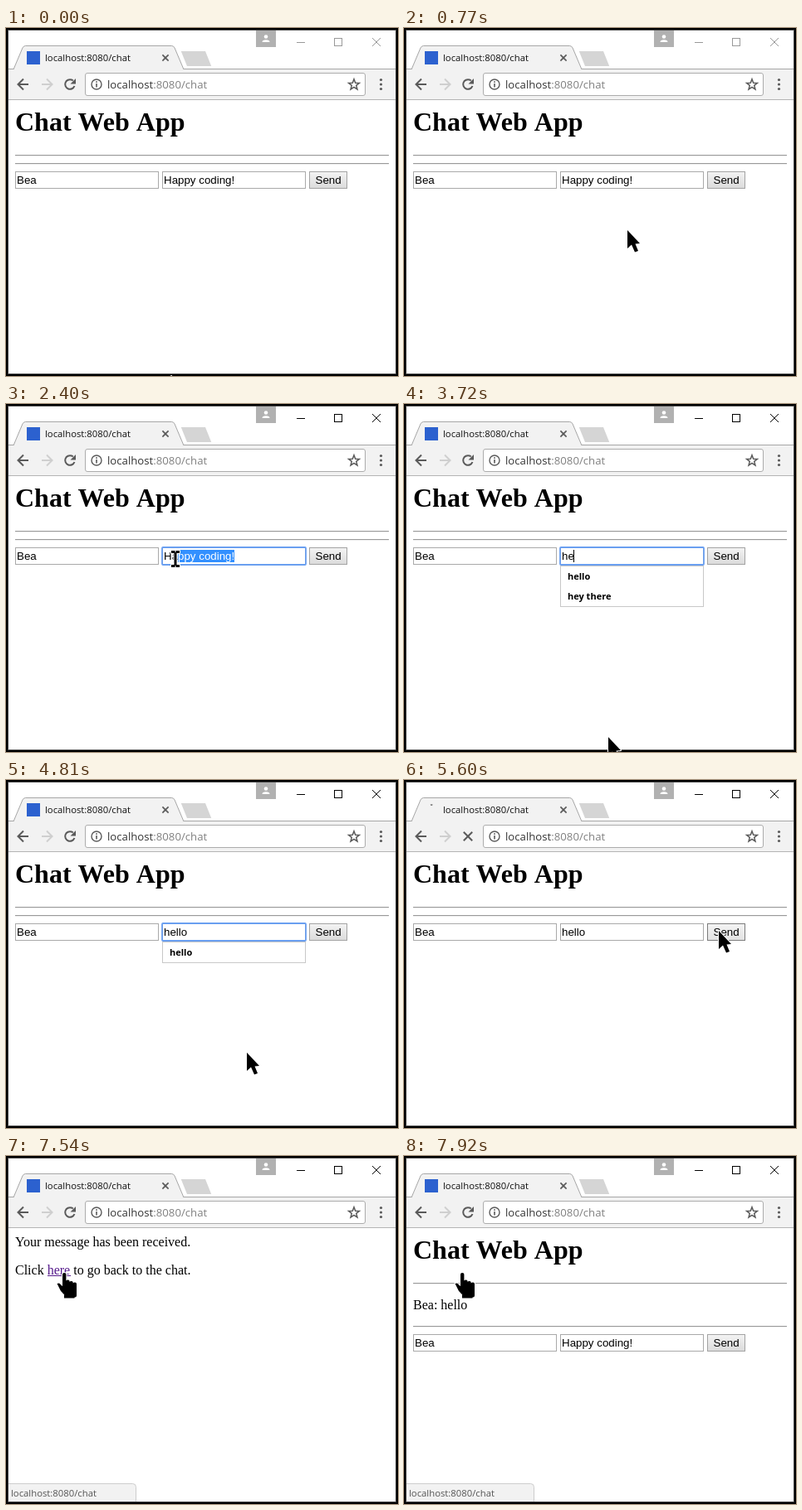
An HTML page with a canvas that plays this animation: 472x420 px, repeating every 8 s.

```html
<!DOCTYPE html>
<html lang="en">
<head>
<meta charset="utf-8">
<title>Chat Web App</title>
<style>
  html, body { margin: 0; width: 100%; height: 100%; overflow: hidden; background: #fff; }
  canvas { display: block; width: 472px; height: 420px; }
</style>
</head>
<body>
<canvas id="stage" width="472" height="420"></canvas>
<script>
const ctx = document.getElementById('stage').getContext('2d');
const LOOP = 8000, TICK = 77.6; // the screen refreshes once per tick
const UI = '"Open Sans", sans-serif';
const SANS = '13.333px "Liberation Sans", Arial, sans-serif';
const SERIF = '"Liberation Serif", "Times New Roman", serif';
const GREY = '#5a5a5a', EDGE = '#a6a6a6', CHROME = '#f2f2f2';
const ADDRESS = 'localhost:8080/chat';
const USER = 'Bea', GREETING = 'Happy coding!', MESSAGE = 'hello';
const SUGGESTIONS = [MESSAGE, 'hey there', GREETING];

// Events, in ticks
const BEAM_IN = 20, FOCUS = 24, DRAG = 28, BEAM_OUT = 38, TYPE = 46;
const PRESS = 70, SUBMIT = 72, RECEIVED = 73, HOVER_LINK = 96, FOLLOW = 99, RETURN = 101;

const linear = p => p;
const easeOut = p => 1 - (1 - p) ** 3;
const START = { x: 199, y: 420 };
const LEGS = [
  { from: 0, to: 11, x: 276, y: 226 },
  { from: 11, to: 22, x: 288, y: 191 },
  { from: 27, to: 36, x: 187, y: 186, ease: easeOut },
  { from: 37, to: 39, x: 246, y: 402 },
  { from: 59, to: 68, x: 379, y: 182 },
  { from: 79, to: 82, x: 349, y: 182 },
  { from: 84, to: 88, x: 244, y: 152 },
  { from: 88, to: 94, x: 74, y: 125 },
  { from: 95, to: 97, x: 69, y: 141 }
];

const within = (v, from, to) => v >= from && v < to;

function pointerAt(n) {
  let { x, y } = START;
  for (const leg of LEGS) {
    if (n <= leg.from) break;
    const p = (leg.ease || linear)(Math.min(1, (n - leg.from) / (leg.to - leg.from)));
    x += (leg.x - x) * p;
    y += (leg.y - y) * p;
  }
  return [Math.round(x), Math.round(y)];
}

function rect(x, y, w, h, fill) {
  ctx.fillStyle = fill;
  ctx.fillRect(x, y, w, h);
}

function stroke(color, width = 1, shape) {
  ctx.strokeStyle = color;
  ctx.lineWidth = width;
  shape ? ctx.stroke(shape) : ctx.stroke();
}

function fill(color, shape) {
  ctx.fillStyle = color;
  shape ? ctx.fill(shape) : ctx.fill();
}

function box(x, y, w, h, edge, back) {
  rect(x, y, w, h, edge);
  rect(x + 1, y + 1, w - 2, h - 2, back);
}

function rounded(x, y, w, h, radius, edge, back) {
  ctx.beginPath();
  ctx.roundRect(x + 0.5, y + 0.5, w - 1, h - 1, radius);
  fill(back);
  stroke(edge);
}

function polygon(...points) {
  const shape = new Path2D();
  points.forEach(([x, y]) => shape.lineTo(x, y));
  shape.closePath();
  return shape;
}

function line(color, width, ...points) {
  ctx.beginPath();
  points.forEach(([x, y]) => ctx.lineTo(x, y));
  stroke(color, width);
}

function cross(x, y, r, color, width) {
  for (const d of [-r, r]) line(color, width, [x - r, y - d], [x + r, y + d]);
}

function arc(x, y, r, from, to, color, width) {
  ctx.beginPath();
  ctx.arc(x, y, r, from, to);
  stroke(color, width);
}

function disc(x, y, r, color) {
  ctx.beginPath();
  ctx.arc(x, y, r, 0, 7);
  fill(color);
}

function widthOf(str, font) {
  ctx.font = font;
  return ctx.measureText(str).width;
}

// Returns the x where the text ends
function text(str, x, y, font, color = '#000') {
  ctx.fillStyle = color;
  const end = x + widthOf(str, font);
  ctx.fillText(str, x, y);
  return end;
}

function drawTitleBar(active) {
  rect(301, 3, 24, 20, '#b1b1b1');
  disc(313, 10.5, 2.3, '#fff');
  ctx.beginPath();
  ctx.ellipse(313, 17, 4.5, 2.7, 0, Math.PI, 0);
  fill('#fff');

  const ink = active ? '#000' : '#999';
  rect(350, 17, 10, 1, ink);
  box(395, 12, 10, 10, ink, '#fff');
  cross(446, 17, 5, ink, 1);
}

function drawTab(spin) {
  line(EDGE, 1, [3, 49.5], [469, 49.5]);
  ctx.beginPath();
  ctx.moveTo(9, 50);
  ctx.arcTo(21, 21.5, 112, 21.5, 4);
  ctx.arcTo(202, 21.5, 214, 50, 4);
  ctx.lineTo(214, 50);
  fill(CHROME);
  stroke(EDGE);

  if (spin === null) rect(25, 28, 16, 16, '#2c61cf');
  else arc(33, 36, 6, spin - 1.75, spin - 1.35, '#777', 1.6);
  text(ADDRESS, 47, 40, '11.3px ' + UI, '#111');
  cross(192, 36, 3.6, GREY, 1.7);

  const button = polygon([213, 29.5], [239, 29.5], [245, 44.5], [219, 44.5]);
  stroke('#d5d5d5', 3, button);
  fill('#d5d5d5', button);
}

function drawArrowIcon(x, dir, color) {
  line(color, 2, [x - 7 * dir, 68], [x + 6 * dir, 68]);
  line(color, 2, [x, 61.5], [x - 6.5 * dir, 68], [x, 74.5]);
}

function drawToolbar(loading) {
  rect(3, 50, 466, 36, CHROME);
  rect(3, 86, 466, 1, '#b4b4b4');
  drawArrowIcon(21, 1, GREY);
  drawArrowIcon(49, -1, '#cfcfcf');
  if (loading) {
    cross(77, 68, 5.2, GREY, 2);
  } else {
    arc(77, 68, 5.8, 0.35, 5.4, GREY, 2);
    fill(GREY, polygon([84, 61], [84, 67.5], [77.5, 67.5]));
  }

  rounded(95, 54, 338, 28, 2.5, '#acacac', '#fff');
  arc(109, 68, 6, 0, 7, GREY, 1.4);
  rect(108.2, 67, 1.6, 4.5, GREY);
  rect(108.2, 64.2, 1.6, 1.7, GREY);
  const [host, rest] = ADDRESS.split(':');
  const end = text(host, 122, 73, '13.2px ' + UI, '#333');
  text(':' + rest, end, 73, '13.2px ' + UI, '#808080');

  const star = Array.from({ length: 10 }, (_, i) => {
    const r = i % 2 ? 2.9 : 6.8, a = i * Math.PI / 5 - Math.PI / 2;
    return [419 + r * Math.cos(a), 68.5 + r * Math.sin(a)];
  });
  stroke(GREY, 1.5, polygon(...star));
  for (let i = -1; i <= 1; i++) disc(451.5, 68 + 5.5 * i, 1.6, GREY);
}

function drawRule(y) {
  rect(11, y, 450, 2, '#eee');
  rect(11, y, 450, 1, '#9a9a9a');
}

function drawField(x, y, value) {
  box(x, y, 173, 21, '#a9a9a9', '#fff');
  text(value, x + 2, y + 15, SANS);
}

function drawButton(y, hover, pressed) {
  const fade = ctx.createLinearGradient(0, y, 0, y + 21);
  fade.addColorStop(0, pressed ? '#d2d2d2' : '#f4f4f4');
  fade.addColorStop(1, pressed || hover ? '#e2e2e2' : '#dadada');
  box(365, y, 46, 21, hover ? '#7c7c7c' : '#a3a3a3', fade);
  text('Send', 372.5, y + 15, SANS);
}

// Selection runs from the character edge nearest the pointer to the end
function drawSelection(pointerX) {
  const edge = i => 190 + widthOf(GREETING.slice(0, i), SANS);
  let first = 0;
  while (first < GREETING.length && (edge(first) + edge(first + 1)) / 2 < pointerX) first++;
  const x = edge(first), left = Math.round(x);
  rect(left, 176, Math.round(edge(GREETING.length)) - left, 15, '#3390ff');
  text(GREETING.slice(first), x, 188, SANS, '#fff');
}

function drawSuggestions(typed) {
  const list = SUGGESTIONS.filter(s => s.toLowerCase().startsWith(typed));
  box(188, 195, 173, 2 + 24 * list.length, '#c8c8c8', '#fff');
  list.forEach((s, i) => text(s, 197, 212 + 24 * i, 'bold 11px ' + UI));
}

function drawFocus(n, typed, pointerX) {
  ctx.beginPath();
  ctx.roundRect(188, 173, 173, 21, 1);
  stroke('#6a9ff0', 1.8);
  if (typed) drawSuggestions(typed);
  else if (n >= DRAG) return drawSelection(n < BEAM_OUT ? pointerX : 0);

  const since = n - (typed ? TYPE + 2 * (typed.length - 1) : FOCUS);
  const x = 190 + widthOf(typed || GREETING, SANS);
  if (since % 14 < 7) rect(Math.round(x) - 1, 176, 1, 15, '#000');
}

function drawChat(n, px, py) {
  const posted = n >= RETURN;
  const y = posted ? 215 : 173;
  text('Chat Web App', 11, 124, 'bold 32px ' + SERIF);
  drawRule(153);
  if (posted) text(`${USER}: ${MESSAGE}`, 11, 185, '16px ' + SERIF);
  drawRule(y - 10);

  // One letter every second tick
  const letters = Math.max(0, Math.floor((n - TYPE) / 2) + 1);
  const typed = posted ? '' : MESSAGE.slice(0, letters);
  drawField(11, y, USER);
  drawField(188, y, typed || GREETING);
  const hover = within(px, 365, 411) && within(py, y, y + 21);
  drawButton(y, hover, within(n, PRESS, SUBMIT));
  if (within(n, FOCUS, PRESS)) drawFocus(n, typed, px);
}

function drawReceipt() {
  const font = '16px ' + SERIF, link = '#551a8b';
  text('Your message has been received.', 11, 109, font);
  const left = text('Click ', 11, 143, font);
  const right = text('here', left, 143, font, link);
  rect(Math.round(left), 144, Math.round(right - left), 1, link);
  text(' to go back to the chat.', right, 143, font);
}

function drawStatus() {
  rounded(2, 395, 155, 24, [0, 4, 0, 0], '#cdcdcd', CHROME);
  text(ADDRESS, 6, 411, '11.3px ' + UI, '#555');
}

function drawBorder() {
  ctx.strokeStyle = '#000';
  ctx.lineWidth = 2;
  ctx.strokeRect(1, 1, 470, 418);
  ctx.strokeStyle = '#484848';
  ctx.lineWidth = 1;
  ctx.strokeRect(2.5, 2.5, 467, 415);
}

const arrow = polygon([0, 0], [0, 22], [5, 17.5], [9, 26.5], [13, 25], [9.5, 16.5], [15, 16]);

const beam = new Path2D();
beam.rect(-1.5, -8, 3, 16);
for (const x of [-5, 0.5]) {
  for (const y of [-10, 7]) beam.rect(x, y, 4.5, 3);
}

// Four fingers, each starting lower than the last, then palm, wrist and thumb
const hand = new Path2D();
for (let i = 0; i < 4; i++) {
  hand.roundRect(-1 + 4.2 * i, i && 7 + 1.5 * i, 4.4, 18, 2);
}
hand.roundRect(-1, 13, 17, 13, 3);
hand.rect(1, 23, 12.5, 7.5);
hand.addPath(polygon([-7.5, 13], [-5, 12.5], [1, 18], [2, 27], [-3, 22]));

function drawPointer(n, x, y) {
  const shape = n >= HOVER_LINK ? hand : within(n, BEAM_IN, BEAM_OUT) ? beam : arrow;
  ctx.save();
  ctx.translate(x, y);
  ctx.lineJoin = 'round';
  stroke('#fff', 2, shape);
  fill('#000', shape);
  ctx.restore();
}

function draw(n) {
  const [x, y] = pointerAt(n);
  const loadStart = within(n, SUBMIT, RECEIVED) ? SUBMIT : within(n, FOLLOW, RETURN) ? FOLLOW : null;
  const loading = loadStart !== null;

  rect(0, 0, 472, 420, '#fff');
  drawTitleBar(n >= FOCUS);
  drawToolbar(loading);
  drawTab(loading ? (n - loadStart) / 2 : null);
  if (within(n, RECEIVED, RETURN)) drawReceipt();
  else drawChat(n, x, y);
  if (n > HOVER_LINK) drawStatus();
  drawBorder();
  drawPointer(n, x, y);
}

const origin = performance.now();
function run() {
  const t = (performance.now() - origin) % LOOP;
  draw(Math.floor((t + 13) / TICK));
  requestAnimationFrame(run);
}
run();
</script>
</body>
</html>
```
